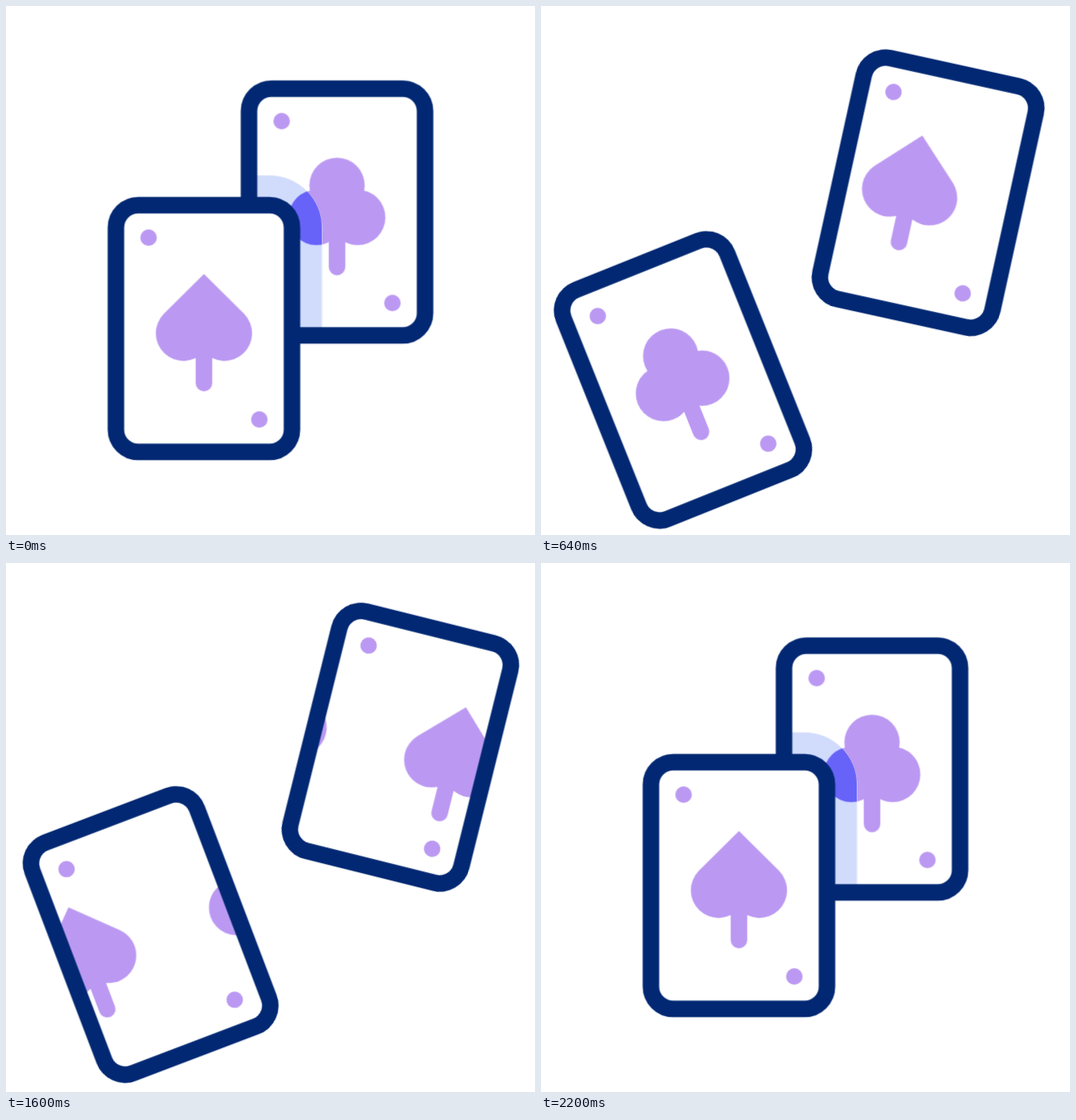
These frames come from a looping animation (640 by 640 pixels, 2.36 s). An HTML page:

```html
<!DOCTYPE html>
<html lang="en">
<head>
<meta charset="utf-8">
<title>Playing cards</title>
<style>
  html, body { margin: 0; width: 100%; height: 100%; overflow: hidden; background: #fff; }
  svg { display: block; width: 100vw; height: 100vh; }

  .ink { color: #bb99f2; fill: currentColor; }
  .shaded { color: #6863f8; fill: currentColor; }
  .paper { fill: #fff; }
  .edge { fill: none; stroke: #022873; stroke-width: 20; }
  .shade { fill: #d1dbfc; }
  .stem {
    fill: none; stroke: currentColor; stroke-width: 20; stroke-linecap: round;
    vector-effect: non-scaling-stroke;
  }

  .front, .back, .slide, .pulse { animation: 2360ms infinite; }
  .front, .back { animation-timing-function: cubic-bezier(.667, 0, .333, 1); }
  .slide, .pulse { animation-timing-function: cubic-bezier(.5, 0, .5, 1); }

  .front { animation-name: front; }
  .back { animation-name: back; }
  .front-out { animation-name: front-out; }
  .front-in { animation-name: front-in; }
  .back-out { animation-name: back-out; }
  .back-in { animation-name: back-in; }
  .pulse { animation-name: pulse; }
  .late { animation-delay: 118ms; }

  /* cards spread apart and return */
  @keyframes front {
    0%, 3.644%, 89.66%, 100% { transform: translate(239.5px, 390.2px) rotate(0deg); }
    29.62%, 61.4% { transform: translate(171.3px, 452.8px) rotate(-22deg); }
  }
  @keyframes back {
    0%, 9.195%, 92.92%, 100% { transform: translate(400.5px, 249.3px) rotate(0deg); }
    35.17%, 66.95% { transform: translate(477.2px, 222.8px) rotate(14deg); }
  }

  /* suits leave to the right and enter from the left */
  @keyframes front-out {
    0%, .932% { transform: translateX(0); }
    30.08% { transform: translateX(215px); animation-timing-function: step-end; }
    51.74% { transform: translateX(-215px); }
    80.38%, 100% { transform: translateX(0); }
  }
  @keyframes front-in {
    0%, .932% { transform: translateX(-215px); }
    30.08%, 51.74% { transform: translateX(0); }
    80.38%, 100% { transform: translateX(215px); }
  }
  @keyframes back-out {
    0%, 6.864% { transform: translateX(0); }
    33.73% { transform: translateX(215px); animation-timing-function: step-end; }
    56.74% { transform: translateX(-215px); }
    84.7%, 100% { transform: translateX(0); }
  }
  @keyframes back-in {
    0%, 6.864% { transform: translateX(-215px); }
    33.73%, 56.74% { transform: translateX(0); }
    84.7%, 100% { transform: translateX(215px); }
  }

  @keyframes pulse {
    0%, 32.29%, 49.24%, 100% { transform: scale(1); }
    40.76% { transform: scale(1.3); }
  }
</style>
</head>
<body>
<svg viewBox="0 0 640 640">
  <defs>
    <rect id="card" x="-106.5" y="-149.25" width="213" height="298.5" rx="27"/>
    <g id="dots">
      <circle cx="-67" cy="-110" r="10"/>
      <circle cx="67" cy="110" r="10"/>
    </g>
    <g id="spade">
      <path d="M0-66L-48.7-17.7A33.5 33.5 0 1 0 0 28.3A33.5 33.5 0 1 0 48.7-17.7Z"/>
      <path class="stem" d="M0 0V66"/>
    </g>
    <g id="club">
      <circle cy="-32.3" r="33.5"/>
      <circle cx="-25" cy="6.5" r="33.5"/>
      <circle cx="25" cy="6.5" r="33.5"/>
      <path class="stem" d="M0 0V66.5"/>
    </g>
    <clipPath id="inside">
      <rect x="-106.5" y="-149.25" width="213" height="298.5" rx="27"/>
    </clipPath>
    <clipPath id="in-back">
      <rect class="back" x="-106.5" y="-149.25" width="213" height="298.5" rx="27"/>
    </clipPath>
    <clipPath id="in-shade">
      <rect class="front" x="-142.5" y="-185.25" width="285" height="370.5" rx="63"/>
    </clipPath>
  </defs>

  <g class="back">
    <use href="#card" class="paper"/>
    <g class="ink" clip-path="url(#inside)">
      <use href="#dots"/>
      <g class="slide back-out"><use href="#club"/></g>
      <g class="slide back-in"><g class="pulse late"><use href="#spade"/></g></g>
    </g>
  </g>

  <!-- shadow of the front card, with the suits tinted where it falls -->
  <g clip-path="url(#in-back)">
    <rect class="shade front" x="-142.5" y="-185.25" width="285" height="370.5" rx="63"/>
  </g>
  <g clip-path="url(#in-shade)">
    <g class="back">
      <g class="shaded" clip-path="url(#inside)">
        <use href="#dots"/>
        <g class="slide back-out"><use href="#club"/></g>
        <g class="slide back-in"><g class="pulse late"><use href="#spade"/></g></g>
      </g>
    </g>
  </g>
  <g class="back"><use href="#card" class="edge"/></g>

  <g class="front">
    <use href="#card" class="paper"/>
    <g class="ink" clip-path="url(#inside)">
      <use href="#dots"/>
      <g class="slide front-out"><use href="#spade"/></g>
      <g class="slide front-in"><g class="pulse"><use href="#club"/></g></g>
    </g>
    <use href="#card" class="edge"/>
  </g>
</svg>
</body>
</html>
```
